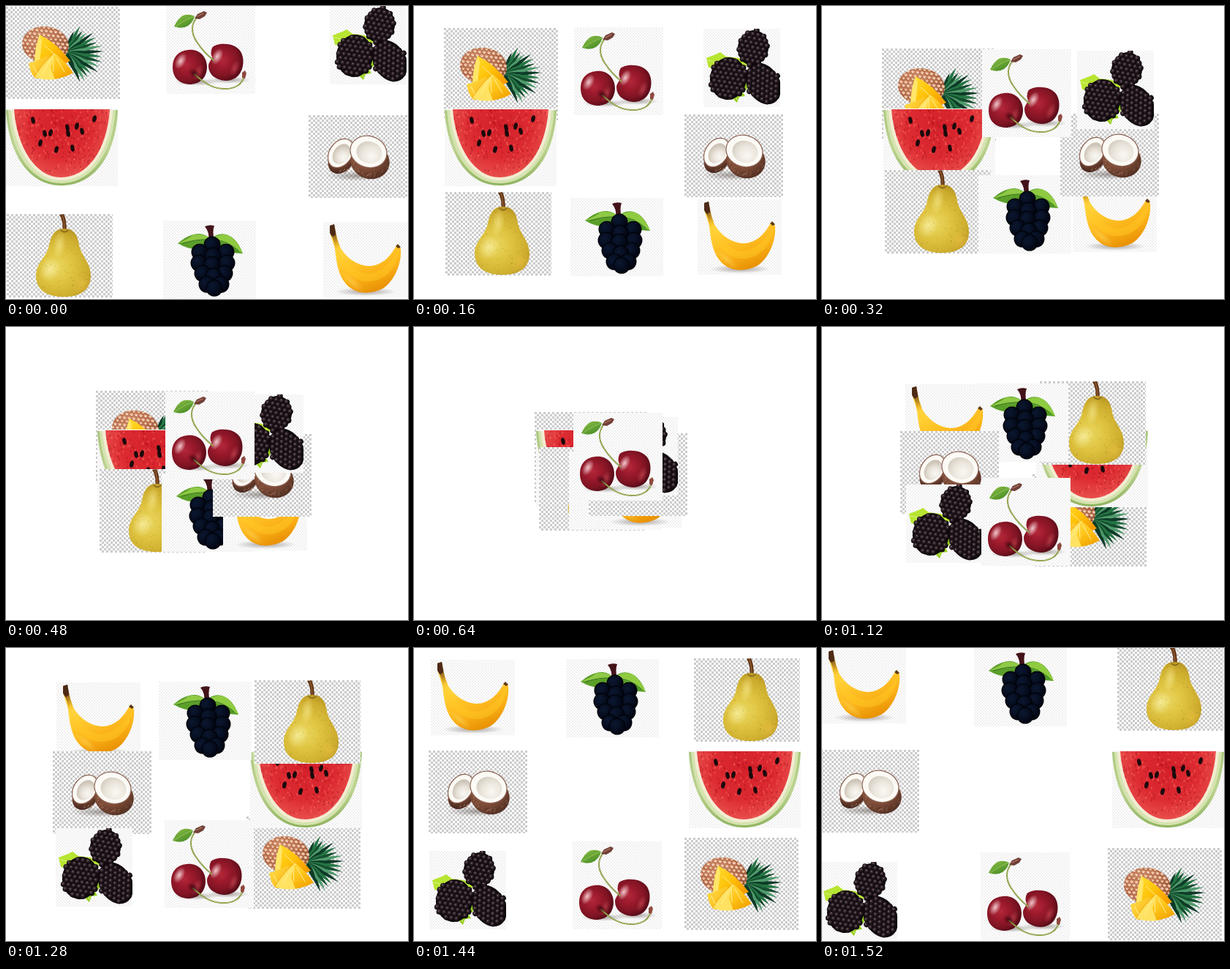
These frames come from a looping animation (550x400 px, 1.6 s). An HTML page with a canvas:

```html
<!DOCTYPE html>
<html lang="en">
<head>
<meta charset="utf-8">
<title>Fruit</title>
<style>
html, body { margin: 0; width: 100%; height: 100%; overflow: hidden; background: #fff; }
canvas { display: block; }
</style>
</head>
<body>
<canvas id="stage" width="550" height="400"></canvas>
<script>
const LOOP = 1600, STEPS = 20, TAU = Math.PI * 2;
let c, seed = 7;

const rnd = () => (seed = seed * 16807 % 2147483647) / 2147483647;
const shape = (d, fill) => { c.fillStyle = fill; c.fill(new Path2D(d)); };

function line(d, color, width) {
  c.strokeStyle = color;
  c.lineWidth = width;
  c.lineCap = 'round';
  c.stroke(new Path2D(d));
}

function oval(x, y, rx, ry, fill, rot = 0) {
  c.fillStyle = fill;
  c.beginPath();
  c.ellipse(x, y, rx, ry, rot, 0, TAU);
  c.fill();
}

function stops(g, colors) {
  colors.forEach((k, i) => g.addColorStop(i / (colors.length - 1), k));
  return g;
}
const radial = (x, y, r, ...k) => stops(c.createRadialGradient(x, y, 0, x, y, r), k);
const linear = (x, y, x2, y2, ...k) => stops(c.createLinearGradient(x, y, x2, y2), k);

function inside(path, draw) {
  c.save();
  c.clip(path);
  draw();
  c.restore();
}

// soft-edged spot of an r,g,b colour
function glow(x, y, rx, ry, rgb, alpha, rot = 0) {
  c.save();
  c.translate(x, y);
  c.rotate(rot);
  c.scale(1, ry / rx);
  oval(0, 0, rx, rx, radial(0, 0, rx, `rgba(${rgb},${alpha})`, `rgba(${rgb},0)`));
  c.restore();
}
const shadow = (x, y, rx, ry) => glow(x, y, rx, ry, '90,80,75', .5);

function checks(w, h, size, color) {
  c.fillStyle = '#fff';
  c.fillRect(0, 0, w, h);
  c.fillStyle = color;
  for (let y = 0; y < h; y += size)
    for (let x = y / size % 2 * size; x < w; x += 2 * size) c.fillRect(x, y, size, size);
}

function pineapple() {
  const greens = ['#0e3b27', '#257544', '#15502f', '#4f9a6b'];
  for (const k of [1.04, .75])
    for (let i = 0; i < 17; i++) {
      const a = -1.3 + 2.4 * i / 16, len = (35 + 15 * Math.cos(a)) * k * (.82 + .2 * rnd());
      c.save();
      c.translate(83, 65);
      c.rotate(a);
      shape(`M0 -3Q${len * .6} -5 ${len} 1Q${len * .6} 2 0 4Z`, greens[i % 4]);
      c.restore();
    }
  const body = new Path2D();
  body.ellipse(54, 52, 32, 25, .12, 0, TAU);
  inside(body, () => {
    c.fillStyle = radial(46, 42, 44, '#cf8b66', '#b96d4d', '#7f4329');
    c.fillRect(0, 0, 156, 126);
    for (let j = 0; j < 11; j++)
      for (let i = 0; i < 12; i++) {
        const x = 20 + i * 6.4 + j % 2 * 3.2, y = 25 + j * 5 + i * .7;
        oval(x, y, 2.8, 2.2, j % 3 ? '#e3ad8b' : '#cf9268', .4);
        oval(x, y + .2, 1.3, 1, '#f8dfcb');
        line(`M${x - 3} ${y}L${x} ${y + 2.7}L${x + 3} ${y}`, '#9c5138', .7);
      }
  });
  shape('M46 38Q40 54 39 76L70 82L88 74Q70 50 46 38Z', linear(42, 45, 78, 78, '#ffdb2e', '#ffc208', '#f59c00'));
  shape('M46 38L49 47L46 76H39Q40 54 46 38Z', '#ffe568');
  shape('M31 77Q46 73 58 66L62 96L41 98Q34 94 31 77Z', linear(32, 76, 58, 98, '#ffd944', '#f9ad06'));
  shape('M66 63Q81 74 92 90Q83 96 67 99Q54 90 55 80Z', linear(60, 64, 80, 98, '#ffdd4b', '#ffc51a', '#f2a400'));
  shape('M66 63L61 83L67 99Q48 101 39 95Q51 76 66 63Z', '#ffe262');
  line('M39 95Q51 76 66 63', '#e89b08', .8);
  line('M61 72L50 91M64 69L65 88M69 70L80 89M37 80L42 90M53 53L67 66', '#fff09a', 1);
}

function melon() {
  shape('M0 2H153C150 66 120 105 75 105C30 105 3 60 0 2Z', linear(0, 0, 0, 106, '#a9c77c', '#bdd391', '#8fb35f'));
  shape('M3 2H150C146 62 116 102 75 102C34 102 7 59 3 2Z', '#d5e3b0');
  shape('M7 2H146C142 60 113 98 75 98C38 98 11 56 7 2Z', '#f3ecd2');
  const flesh = new Path2D('M11 1H142C138 58 111 94 75 94C41 94 15 54 11 1Z');
  inside(flesh, () => {
    c.fillStyle = radial(76, 24, 86, '#d3202a', '#dd2b32', '#ee625a');
    c.fillRect(0, 0, 153, 106);
    for (let i = 0; i < 400; i++)
      oval(8 + rnd() * 138, 1 + rnd() * 94, 1, 1.7, i % 2 ? 'rgba(255,120,108,.4)' : 'rgba(150,0,18,.32)');
  });
  const seeds = [37, 16, 121, 14, 53, 34, 61, 33, 85, 34, 97, 24, 84, 26, 47, 47, 91, 54, 69, 56, 104, 31];
  for (let i = 0; i < seeds.length; i += 2)
    oval(seeds[i], seeds[i + 1], 2.7, 4.8, '#1a0a0c', i % 4 ? .25 : -.2);
}

function pear() {
  shape('M72 1L78 0Q82 7 82 25L76 25Q78 10 72 1Z', '#653719');
  line('M76 2Q79 9 79 22', '#a06a38', 1);
  const body = new Path2D('M78 20C91 19 97 28 99 42C102 58 115 66 115 84C115 103 102 113 78 113C54 113 40 103 40 84C40 66 55 59 58 42C61 28 66 20 78 20Z');
  inside(body, () => {
    c.fillStyle = radial(68, 72, 66, '#ead75f', '#dfc441', '#cdac2d', '#9e7c1b');
    c.fillRect(0, 0, 145, 114);
    glow(72, 42, 9, 19, '255,248,170', .5, .15);
    glow(59, 76, 14, 17, '255,250,190', .6, .4);
    glow(103, 96, 16, 14, '240,195,70', .5);
    for (let i = 0; i < 110; i++) oval(40 + rnd() * 76, 25 + rnd() * 88, .55, .55, 'rgba(112,88,12,.35)');
  });
  line('M74 22Q79 27 84 22', '#806419', 1.2);
}

function grapes() {
  shape('M65 25C53 13 36 17 20 31Q34 39 46 39Q57 39 66 27Z', '#5b9f2a');
  shape('M65 25Q54 16 40 20Q35 25 20 31Q46 27 65 25Z', '#8fc945');
  shape('M65 25C80 11 100 19 109 45Q97 45 86 42Q75 37 65 27Z', '#559c29');
  shape('M65 25Q82 15 93 22Q104 31 109 45Q89 29 65 25Z', '#8fcb40');
  line('M63 26Q45 25 27 31M67 26Q87 26 103 41', '#316c1d', 1);
  shape('M57 8Q63 5 70 7Q67 14 70 28H62Q64 16 57 8Z', '#421319');
  const rows = [[33, 67], [43, 50, 86], [48, 68], [58, 49, 87], [60, 67], [72, 54, 84], [76, 69], [87, 60, 79], [92, 70]];
  for (const [y, ...xs] of rows)
    for (const x of xs) {
      oval(x, y, 11.5, 11.5, '#010309');
      oval(x, y, 10.3, 10.3, radial(x - 3, y - 3, 13, '#0b1730', '#071024', '#030613'));
    }
}

function banana() {
  shadow(58, 95, 42, 6);
  shape('M10 17L18 19Q20 26 23 34C32 50 48 60 64 60C80 59 91 48 99 34L102 31L106 36C108 58 96 82 81 91C67 98 48 99 36 89C21 77 18 56 16 36Z',
    linear(35, 40, 56, 97, '#ffd23a', '#ffc226', '#fab017', '#ea9406'));
  shape('M18 36C26 53 39 67 60 71C80 70 96 52 104 37C101 63 86 79 64 81C39 81 24 64 18 36Z', 'rgba(255,202,36,.45)');
  glow(40, 82, 20, 6, '255,225,110', .4, .7);
  shape('M9 5L15 3L19 23L24 36L16 40Q16 24 10 17Z', linear(13, 12, 20, 38, '#6e451b', '#c08f25', 'rgba(250,185,30,0)'));
  shape('M9 5L15 3L17 17L13 20L9 15Z', '#4d2a16');
  shape('M99 33L102 30L106 34L103 36Z', '#5e3a13');
}

function coconut() {
  shadow(65, 83, 42, 7);
  const half = (x, y, rx, ry, rot, drop) => {
    oval(x + 2, y + drop, rx + 1, ry + 2, radial(x - 4, y, rx * 1.65, '#a56c4f', '#84503a', '#4a2a20'), rot);
    for (let i = 0; i < 42; i++) {
      const a = rnd() * Math.PI, r = .8 + rnd() * .18;
      const px = x + 2 + Math.cos(a) * rx * r, py = y + drop + Math.sin(a) * ry * r;
      line(`M${px} ${py}l2 -2`, i % 2 ? '#b98a6e' : '#51301f', .6);
    }
    oval(x, y, rx, ry, '#8a6050', rot);
    oval(x, y, rx - 1.2, ry - 1.2, '#fcfaf5', rot);
    oval(x + 1, y + 1, rx * .68, ry * .68, radial(x + 4, y + 6, rx, '#faf8f3', '#ebe6dd', '#cdc4b7'), rot);
  };
  half(44, 52, 16, 22, .6, 6);
  half(82, 50, 26, 22, .3, 13);
}

function blackberry() {
  shape('M4 40L17 35L23 32L31 38L48 40L60 48L52 62L14 64L15 54L7 53Z', '#b8e532');
  shape('M28 89L41 76L59 70L62 80L54 87L57 92L49 93L46 101L40 95L33 97Z', '#97cf22');
  line('M6 43Q22 45 35 57M40 82L46 97', '#dbf282', 1);
  const lobe = (x, y, rx, ry, rot) => {
    c.save();
    c.translate(x, y);
    c.rotate(rot);
    oval(0, 0, rx, ry, '#100a0e');
    for (let j = -5; j <= 5; j++)
      for (let i = -5; i <= 5; i++) {
        const px = i * 7.2 + (j & 1) * 3.6, py = j * 6;
        if ((px / rx) ** 2 + (py / ry) ** 2 > 1) continue;
        oval(px, py, 4, 3.8, radial(px - 1, py - 1, 4.3, '#54434b', '#2a1d24', '#0b070a'));
        oval(px - 1, py - 1.2, .8, .6, '#85767e');
      }
    c.restore();
  };
  lobe(68, 26, 21, 24, .2);
  lobe(82, 75, 22, 30, -.5);
  lobe(34, 68, 25, 29, .15);
}

function cherry() {
  shadow(42, 104, 30, 5);
  shadow(86, 101, 30, 5);
  shape('M39 14Q31 10 23 13Q16 17 11 28Q22 32 30 27Q37 22 39 14Z', linear(18, 13, 27, 31, '#83b941', '#4a8d27'));
  line('M39 14Q26 18 13 28', '#9fcb65', .8);
  const fruit = (x, y, d) => {
    shape(d, radial(x - 5, y - 3, 32, '#b3283a', '#9c1a2c', '#801423', '#4a0814'));
    glow(x - 12, y - 8, 7, 12, '255,228,230', .85, .5);
    glow(x + 12, y + 8, 6, 12, '225,90,100', .5, .4);
  };
  fruit(32, 83, 'M30 60C45 58 56 69 56 83C56 98 46 107 32 107C18 106 9 98 9 83C9 70 17 61 30 60Z');
  fruit(82, 77, 'M63 57C69 50 86 51 94 55C104 60 107 71 105 82C102 96 93 102 81 102C66 101 58 92 58 82C58 77 62 74 63 70Q60 64 63 57Z');
  const stem = d => {
    line(d, '#7f9138', 2);
    line(d, '#bccb80', .7);
  };
  stem('M45 13C33 23 34 37 42 49Q52 64 65 74');
  stem('M39 93C51 104 61 112 78 113C95 114 105 106 107 95');
  shape('M39 17L43 11L52 7L56 9L53 14L46 18Z', '#704038');
  line('M43 14L51 10', '#b87964', 1.2);
  shape('M104 91L108 88L110 92L108 99L104 98Z', '#8f493f');
  glow(39, 92, 9, 6, '45,0,9', .7, .5);
}

const coarse = [3, '#cbcbcb'], fine = [2, '#f0f0f0'];

// painter, width, height, start x y, end x y, backdrop; back to front
const tiles = [
  [pineapple, 156, 126, 0, 1, 391, 273, coarse],
  [melon, 153, 106, 0, 140, 397, 140, fine],
  [pear, 145, 114, 1, 284, 404, -1, coarse],
  [grapes, 127, 107, 215, 293, 208, 0, fine],
  [banana, 115, 103, 434, 295, 0, 0, fine],
  [coconut, 135, 113, 414, 149, -2, 139, coarse],
  [blackberry, 105, 107, 443, 0, -2, 292, fine],
  [cherry, 122, 120, 219, 0, 217, 279, fine]
].map(([paint, w, h, x, y, x2, y2, back]) => {
  const img = document.createElement('canvas');
  img.width = w;
  img.height = h;
  c = img.getContext('2d');
  checks(w, h, ...back);
  paint();
  return { img, x, y, dx: x2 - x, dy: y2 - y };
});

const stage = document.getElementById('stage').getContext('2d');

function frame() {
  const step = Math.floor(performance.now() % LOOP / LOOP * STEPS), p = step / (STEPS - 1);
  stage.fillStyle = '#fff';
  stage.fillRect(0, 0, 550, 400);
  for (const t of tiles)
    stage.drawImage(t.img, Math.round(t.x + t.dx * p), Math.round(t.y + t.dy * p));
  requestAnimationFrame(frame);
}
frame();
</script>
</body>
</html>
```
